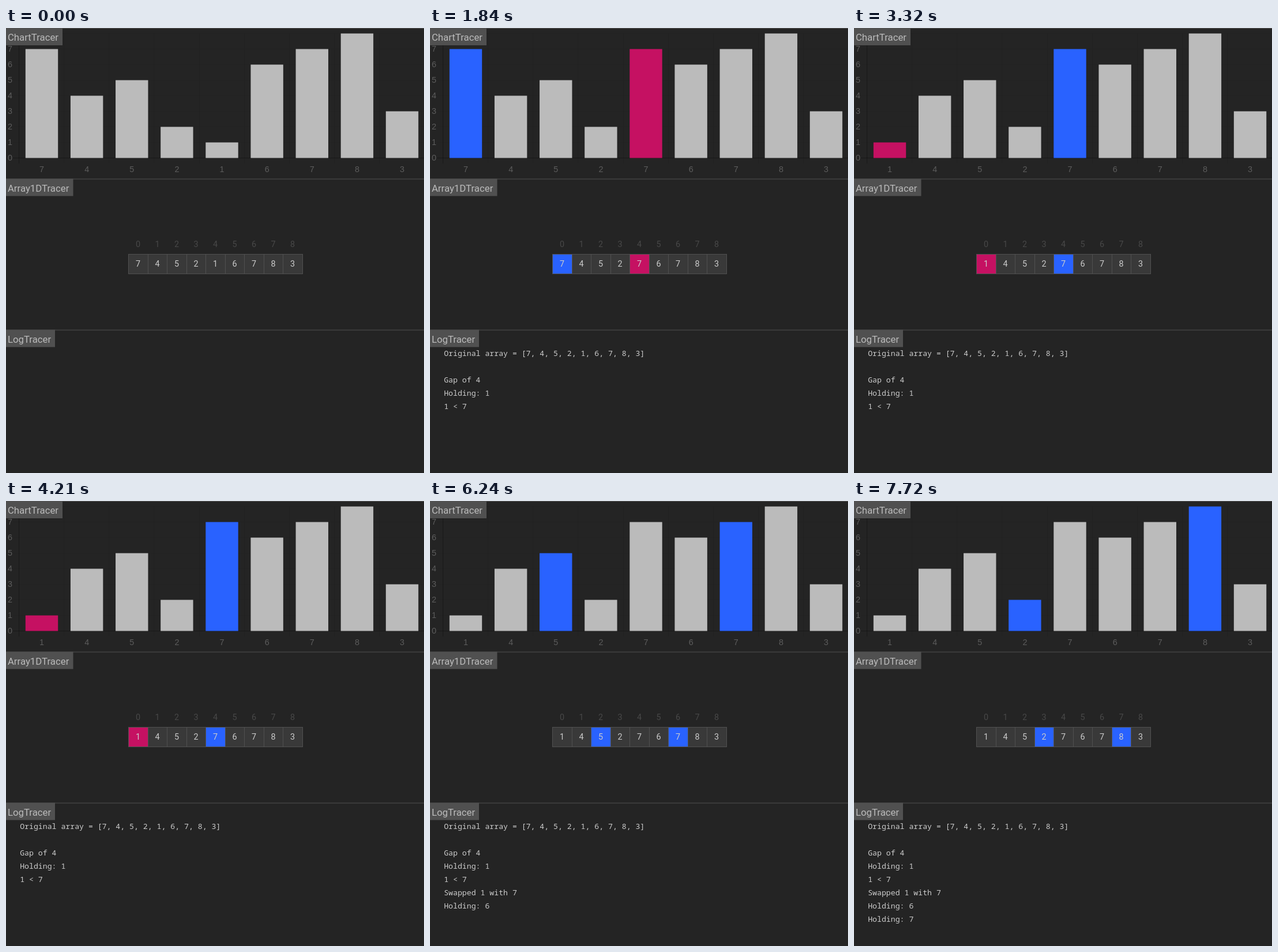
An HTML page with a canvas that plays this animation: 725x772 px, repeating every 8000 ms.

```html
<!DOCTYPE html>
<html lang="en">
<head>
<meta charset="utf-8">
<title>Gap sort tracer</title>
<style>
html, body { margin: 0; width: 100%; height: 100%; overflow: hidden; background: #242424; }
canvas { display: block; }
</style>
</head>
<body>
<canvas id="stage" width="725" height="772"></canvas>
<script>
const ctx = document.getElementById('stage').getContext('2d');
const LOOP = 8000;
const BLUE = '#2962ff', RED = '#c51162', GREY = '#bbbbbb';
const ROBOTO = 'Roboto, sans-serif';
const ARIAL = '14.4px "Liberation Sans", Arial, sans-serif';
const MONO = '13.2px "Noto Sans Mono", monospace';

const log = [
  'Original array = [7, 4, 5, 2, 1, 6, 7, 8, 3]', '', 'Gap of 4',
  'Holding: 1', '1 < 7', 'Swapped 1 with 7', 'Holding: 6', 'Holding: 7'
];
const start = [7, 4, 5, 2, 1, 6, 7, 8, 3];
const held = [7, 4, 5, 2, 7, 6, 7, 8, 3];
const swapped = [1, 4, 5, 2, 7, 6, 7, 8, 3];

// Each step: start time, values, marked cells, visible log lines
const steps = [
  { at: 0, values: start, marks: {}, lines: 0 },
  { at: 390, values: start, marks: { 0: BLUE, 4: BLUE }, lines: 3 },
  { at: 1840, values: held, marks: { 0: BLUE, 4: RED }, lines: 5 },
  { at: 3320, values: swapped, marks: { 0: RED, 4: BLUE }, lines: 5 },
  { at: 4800, values: swapped, marks: { 1: BLUE, 5: BLUE }, lines: 6 },
  { at: 6240, values: swapped, marks: { 2: BLUE, 6: BLUE }, lines: 7 },
  { at: 7720, values: swapped, marks: { 3: BLUE, 7: BLUE }, lines: 8 }
];

function rect(x, y, w, h, color) {
  ctx.fillStyle = color;
  ctx.fillRect(x, y, w, h);
}

function text(str, x, y, font, color, align = 'left') {
  ctx.font = font;
  ctx.fillStyle = color;
  ctx.textAlign = align;
  ctx.fillText(str, x, y);
}

function panel(title, y, width) {
  rect(0, y, 725, 1, '#505050');
  rect(0, y, width, 30, '#505050');
  text(title, 2.9, y + 22, '16.8px ' + ROBOTO, GREY);
}

function drawChart({ values, marks }) {
  const base = 225, unit = 27, pitch = 78.13, left = 22;
  for (let v = 0; v <= 8; v++) {
    const y = base - unit * v;
    rect(12, y, 713, 1, v ? 'rgba(0,0,0,.06)' : 'rgba(0,0,0,.3)');
    if (v < 8) text(v, 11, y + 5, ARIAL, '#5c5c5c', 'right');
  }
  values.forEach((v, i) => {
    const x = left + pitch * i;
    rect(Math.round(x), 9, 1, 226, i ? 'rgba(0,0,0,.06)' : 'rgba(0,0,0,.3)');
    rect(x + 11.8, base - unit * v + 0.5, 56.4, unit * v, marks[i] || GREY);
    text(v, x + 40, 250, ARIAL, '#5c5c5c', 'center');
  });
}

function drawArray({ values, marks }) {
  const left = 212, top = 392, pitch = 33.5, font = '14.4px ' + ROBOTO;
  values.forEach((v, i) => {
    const x = Math.round(left + pitch * i), mid = left + pitch * (i + 0.5) + 0.3;
    const w = Math.round(left + pitch * (i + 1)) - x;
    rect(x, top, w + 1, 35, '#505050');
    rect(x + 1, top + 1, w - 1, 33, marks[i] || '#393939');
    text(i, mid, 380, font, '#484848', 'center');
    text(v, mid, 414, font, '#cccccc', 'center');
  });
}

function draw(now) {
  const t = now % LOOP;
  const step = steps.findLast(s => s.at <= t) || steps[0];
  rect(0, 0, 725, 772, '#242424');
  drawChart(step);
  drawArray(step);
  panel('ChartTracer', 0, 98);
  panel('Array1DTracer', 261.5, 116.5);
  panel('LogTracer', 523.5, 85);
  log.slice(0, step.lines).forEach((line, i) => text(line, 24.2, 569 + 23 * i, MONO, '#cccccc'));
}

let origin;
function tick(now) {
  origin ??= now;
  draw(now - origin);
  requestAnimationFrame(tick);
}
requestAnimationFrame(tick);
</script>
</body>
</html>
```
